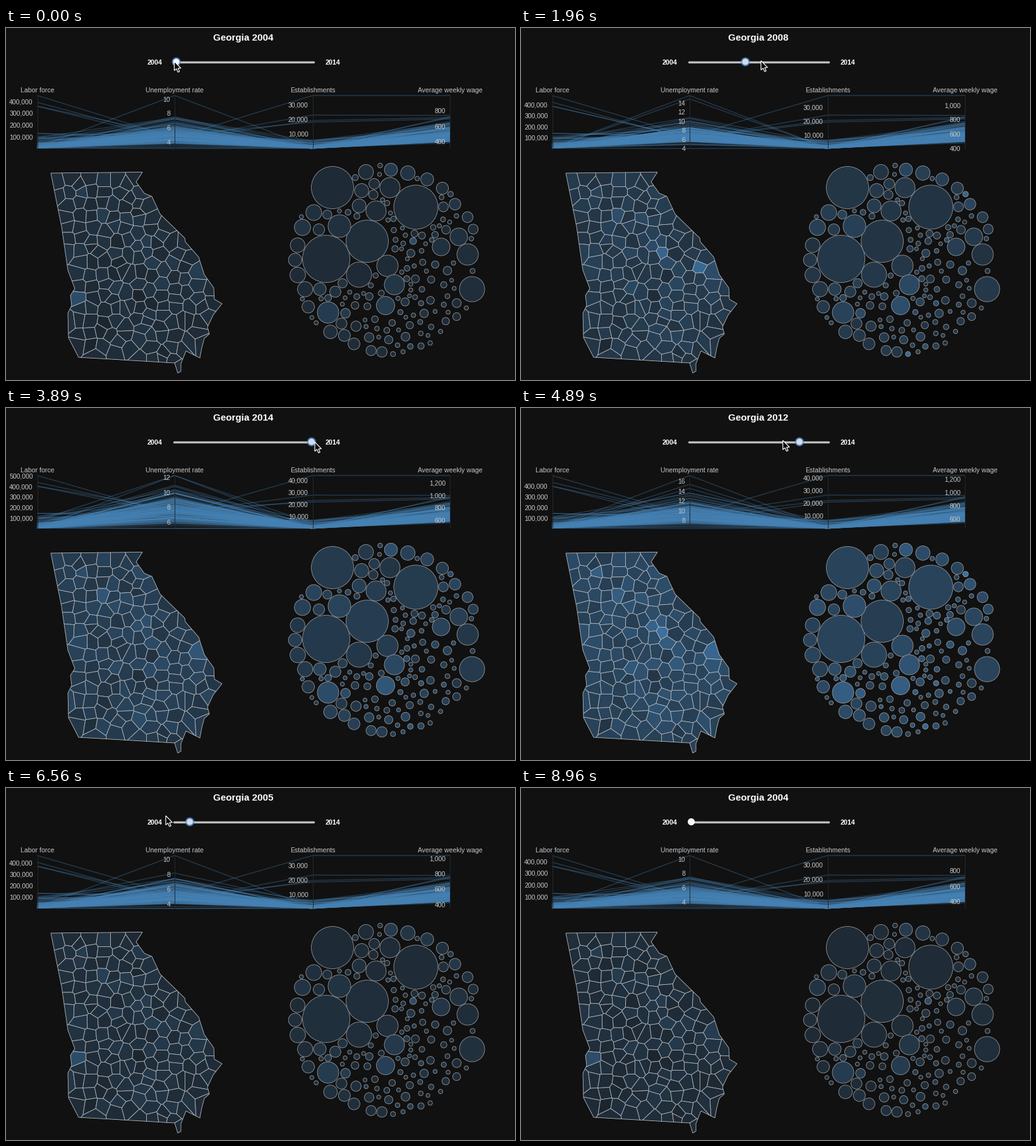
These frames come from a looping animation (806 by 558 pixels, 9.28 s). A matplotlib script:

```python
import numpy as np
import matplotlib.pyplot as plt
from matplotlib.animation import FuncAnimation
from matplotlib.collections import LineCollection, PatchCollection, PolyCollection
from matplotlib.patches import Circle, Polygon
from matplotlib.path import Path

W, H, DPI = 806, 558, 100
LOOP, STEP = 9280, 80
PX = 72 / DPI
BG, GREY, BORDER = "#111111", "#c6c6c6", "#bfc4c8"
TOP, BOTTOM = 107, 191
FIRST, LAST = 2004, 2014
plt.rcParams["font.family"] = "Liberation Sans"
rng = np.random.default_rng(5)

KEY_YEARS = [2004, 2005, 2008, 2009, 2011, 2014]
LOWEST_RATE = [3.1, 3.4, 4.0, 6.3, 6.9, 5.15]
MEAN_RATE = [5.0, 5.3, 7.0, 9.9, 10.3, 7.8]
HIGHEST_RATE = [10.5, 10.5, 15.65, 19.4, 19.7, 12.25]

# Time (ms) against slider value and cursor position.
SLIDER = np.array([(600, 0), (880, 1), (1790, 4), (2500, 7), (3800, 10),
                   (4100, 10.9), (5700, 5.4), (6560, 1.3), (6960, .99), (6961, 0)])
CURSOR = np.array([(400, 266.5, 53), (790, 274, 54), (1970, 380, 52),
                   (2610, 414, 53), (3700, 489, 54), (4100, 489, 54),
                   (5730, 343, 49), (6610, 253, 44), (7180, 226, 38),
                   (7650, 754, 78), (7800, 738, 80), (8600, 738, 80),
                   (8690, 739, 542)])
ARROW = np.array([(0, 0), (0, 14.5), (3.4, 11.6), (5.8, 17), (8.2, 16),
                  (5.9, 10.8), (10.4, 10.6)])

STATE = [(71, 230), (216, 228.5), (206, 244), (219, 262), (231, 267), (244, 295),
         (283, 333), (284, 339), (305, 363), (314, 391), (329, 412), (330, 430),
         (342, 437), (328, 455), (319, 474), (322, 485), (314, 492), (310, 507),
         (307, 523), (285, 512), (277, 532), (277, 544), (272, 547), (267, 531),
         (115, 522), (99, 491), (98, 452), (104, 440), (102, 424), (109, 413),
         (98, 384), (88, 315)]

# Counties with unusual rates: x, y, first and last year, pull to the maximum.
HOT = [(115, 430, 2004, 2005, 1), (257, 363, 2004, 2006, .35),
       (223, 348, 2007, 2012, .9), (283, 381, 2007, 2009, 1),
       (302, 380, 2010, 2012, .4), (231, 440, 2008, 2009, .3)]

LARGE = [(507, 366, 37.5), (649, 284, 35), (517, 253, 33.5), (572, 338, 33.5),
         (738, 414, 20), (559, 391, 20), (528, 314, 18), (731, 359, 17),
         (604, 377, 17), (510, 451, 17), (586, 290, 16), (608, 253, 16),
         (615, 407, 16), (717, 331, 14), (689, 347, 14), (601, 440, 14.5)]


def growth(start, end, power=1):
    return lambda year: start + (end - start) * ((year - FIRST) / (LAST - FIRST)) ** power


def through(values):
    return lambda year: np.interp(year, KEY_YEARS, values)


# Name, x, tick step, lowest and highest value by year.
AXES = [("Labor force", 49.5, 100000, growth(0, 0), growth(449e3, 503e3, .6)),
        ("Unemployment rate", 267, 2, through(LOWEST_RATE), through(HIGHEST_RATE)),
        ("Establishments", 485.5, 10000, growth(0, 0), growth(36.3e3, 43.9e3, 1.5)),
        ("Average weekly wage", 703, 200, growth(315, 475, .7), growth(994, 1315, .9))]


def distance(points, x, y):
    return np.hypot(points[:, 0] - x, points[:, 1] - y)


def county_seeds(pitch=18.6):
    """A square lattice, regular in the west and tilted along the eastern border."""
    x, y = np.meshgrid(np.arange(80, 345, pitch), np.arange(130, 540, pitch))
    x, y = x.ravel(), y.ravel()
    y = y + .45 * np.maximum(x - 180, 0)
    spread = np.interp(x, [100, 220], [2.6, 4.2])
    seeds = np.column_stack([x, y]) + rng.normal(0, 1, (x.size, 2)) * spread[:, None]
    return seeds[Path(STATE).contains_points(seeds)]


def keep_nearer(poly, p, q):
    """Cut a polygon to the part nearer to p than to q."""
    mid, normal = (p + q) / 2, q - p
    side = [(v - mid) @ normal for v in poly]
    out = []
    for i, v in enumerate(poly):
        a, b = side[i - 1], side[i]
        if (a < 0) != (b < 0):
            out.append(poly[i - 1] + (v - poly[i - 1]) * a / (a - b))
        if b < 0:
            out.append(v)
    return out


def county_cells(seeds):
    box = [np.array(c, float) for c in [(40, 200), (370, 200), (370, 560), (40, 560)]]
    cells = []
    for p in seeds:
        poly = box
        for j in np.argsort(distance(seeds, *p))[1:24]:
            poly = keep_nearer(poly, p, seeds[j])
        cells.append(poly)
    return cells


def pack_bubbles(total):
    """Add ever smaller bubbles: medium ones at the rim, small ones in the gaps."""
    bubbles = list(LARGE)
    for i in range(total - len(LARGE)):
        size = 2.8 + 10 * np.exp(-i / 40)
        angle = rng.uniform(0, 2 * np.pi, 500)
        reach = (155 - size) * np.sqrt(rng.uniform(0, 1, 500))
        spots = np.column_stack([601 + reach * np.cos(angle), 367 + reach * np.sin(angle)])
        x, y = spots.T
        loose = (y > 430) | ((x > 646) & (y > 345))
        room = np.min([distance(spots, *b[:2]) - b[2] for b in bubbles], axis=0)
        room -= np.where(loose & (i > 34), 4, .6)
        fits = np.flatnonzero(room >= size)
        if not fits.size:
            k = np.argmax(room)
        elif i < 34:
            k = fits[np.argmax(distance(spots[fits], 650, 400))]
        else:
            k = fits[0]
        bubbles.append((x[k], y[k], np.clip(room[k], 1.5, size)))
    return np.array(bubbles)


seeds = county_seeds()
count = len(seeds)
bubbles = pack_bubbles(count)
# The largest bubbles belong to counties around the capital.
owner = np.argsort(distance(seeds, 128, 300) + rng.normal(0, 40, count))

east = np.exp(-(distance(seeds, 235, 380) / 75) ** 2)
factor = np.exp(rng.normal(0, .15, count)) * (.96 + .1 * east)
factor[owner[:4]] = .92
wobble = rng.normal(1, .05, (LAST - FIRST + 1, count))
labor = (bubbles[:, 2] / bubbles[0, 2]) ** 2
estab = .66 * labor * rng.uniform(.75, 1.1, count)
wage = np.clip(.24 * np.exp(rng.normal(0, .38, count)) + .45 * labor, 0, .75)
estab[0] = wage[0] = 1


def shade(rates):
    mix = np.clip((rates - 3.3) / 16.5, 0, 1)[:, None]
    return (np.array([28, 37, 45]) * (1 - mix) + np.array([66, 126, 180]) * mix) / 255


def year_data(year):
    low, high = (limit(year) for limit in AXES[1][3:])
    rates = through(MEAN_RATE)(year) * factor * wobble[year - FIRST]
    for x, y, first, last, pull in HOT:
        if first <= year <= last:
            k = np.argmin(distance(seeds, x, y))
            rates[k] += (high - rates[k]) * pull
    rates[np.argmin(rates)] = low
    rates[np.argmax(rates)] = high
    rates = np.clip(rates, low, high)
    columns = [labor, (rates[owner] - low) / (high - low), estab, wage]
    lines = [[(axis[1], BOTTOM - (BOTTOM - TOP) * v) for axis, v in zip(AXES, row)]
             for row in zip(*columns)]
    return shade(rates), shade(rates[owner]), lines


DATA = {year: year_data(year) for year in range(FIRST, LAST + 1)}

fig = plt.figure(figsize=(W / DPI, H / DPI), dpi=DPI, facecolor=BG)
ax = fig.add_axes([0, 0, 1, 1])
ax.set(xlim=(0, W), ylim=(H, 0))
ax.axis("off")


def label(x, y, text="", size=10.5, color=GREY, ha="center", weight="normal"):
    return ax.text(x, y, text, size=size * PX, color=color, ha=ha,
                   va="center_baseline", weight=weight, zorder=5)


title = label(376, 14.5, size=15.1, color="white", weight="bold")
label(236, 53.5, str(FIRST), 10.8, "white", weight="bold")
label(517, 53.5, str(LAST), 10.8, "white", weight="bold")
ax.plot([265.5, 487], [53.8, 53.8], color="#bcbcbc", lw=3.4 * PX, solid_capstyle="round")
halo = [ax.add_patch(Circle((0, 53.6), r, fc="#4a90d9", ec="none", alpha=a, zorder=4))
        for r, a in ((7.4, .3), (6.7, .75))]
knob = ax.add_patch(Circle((0, 53.6), 5, ec="none", zorder=4))

parallel = ax.add_collection(LineCollection([], colors="steelblue", alpha=.34, lw=1.5 * PX))
ticks = []
for name, x, *_ in AXES:
    label(x, 98.5, name)
    ax.plot([x, x], [TOP, BOTTOM], color="#22282d", lw=PX, zorder=3)
    ticks.append([label(x - 6.8, 0, ha="right") for _ in range(7)])

counties = ax.add_collection(PolyCollection(county_cells(seeds), ec=BORDER, lw=.75 * PX))
counties.set_clip_path(Path(STATE + STATE[:1]), ax.transData)
ax.add_patch(Polygon(STATE, fill=False, ec=BORDER, lw=.8 * PX))
dots = ax.add_collection(PatchCollection([Circle((x, y), r) for x, y, r in bubbles],
                                         ec="#989da1", lw=.8 * PX))
cursor = ax.add_patch(Polygon(ARROW, fc="black", ec="white", lw=1.2 * PX, zorder=9))


def show_ticks(year):
    for (_, _, step, lowest, highest), pool in zip(AXES, ticks):
        low, high = lowest(year), highest(year)
        values = np.arange(max(1, np.ceil(low / step)), np.floor(high / step) + 1) * step
        for text in pool:
            text.set_text("")
        for text, value in zip(pool, values):
            text.set_text(f"{value:,.0f}")
            text.set_y(BOTTOM - (BOTTOM - TOP) * (value - low) / (high - low))


def update(frame):
    t = frame * STEP + 50
    year = FIRST + int(np.interp(t, *SLIDER.T))
    county_fill, dot_fill, lines = DATA[year]
    title.set_text(f"Georgia {year}")
    show_ticks(year)
    counties.set_facecolor(county_fill)
    dots.set_facecolor(dot_fill)
    parallel.set_segments(lines)

    focused = t < 8600
    for part in (*halo, knob):
        part.center = 269.6 + 21.42 * (year - FIRST), 53.6
    for part in halo:
        part.set_visible(focused)
    knob.set_radius(5 if focused else 5.6)
    knob.set_facecolor("#d5dbe6" if 260 <= t < 8600 else "#f4f6f9")

    times, xs, ys = CURSOR.T
    cursor.set_xy(ARROW + (np.interp(t, times, xs), np.interp(t, times, ys)))
    cursor.set_visible(t < 8960)


anim = FuncAnimation(fig, update, frames=LOOP // STEP, interval=STEP,
                     repeat=True, repeat_delay=0)
plt.show()
```
